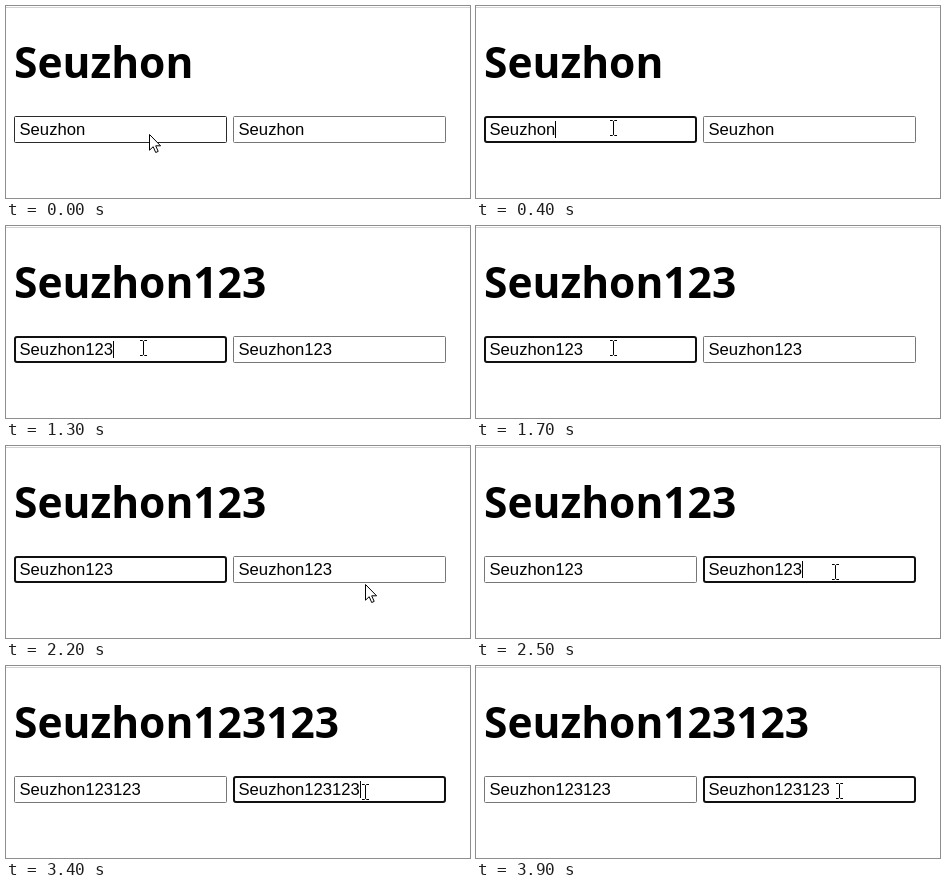
Write an HTML page that moves like this. It is 464x192 px and loops after 4 s.

```html
<!DOCTYPE html>
<html lang="en">
<head>
<meta charset="utf-8">
<title>Linked inputs</title>
<style>
  html, body { margin: 0; width: 100%; height: 100%; overflow: hidden; background: #fff; }
  svg { display: block; width: 464px; height: 192px; }
  .title { font: 700 42.5px "Open Sans", "Noto Sans", sans-serif; }
  .value { font: 16.67px "Liberation Sans", Arial, sans-serif; }
  .box { fill: #fff; stroke: #767676; stroke-width: 1; }
  .hover .box { stroke: #2b2b2b; }
  .focus .box { stroke: #101010; stroke-width: 2; }
  .caret { stroke: #000; stroke-width: 1; }
  .squiggle { fill: none; stroke: #b8403a; stroke-width: 1.2; }
</style>
</head>
<body>
<svg viewBox="0 0 464 192">
  <path d="M0 1.5H464" stroke="#d3d3d3"/>
  <text class="title" x="8" y="71.5"></text>
  <g id="fields"></g>
  <path id="arrow" d="M.5 .5V16.2L4.2 12.7L6.7 18.5L9.2 17.4L6.7 11.8H11.6Z" fill="#fff" stroke="#000"/>
  <path id="beam" d="M-3.5 -7.5H-1L0 -6.5L1 -7.5H3.5M0 -6.5V6.5M-3.5 7.5H-1L0 6.5L1 7.5H3.5" fill="none" stroke="#000"/>
</svg>
<script>
const LOOP = 4000, STEP = 100, NAME = "Seuzhon";
const KEY_TIMES = [1100, 1200, 1300, 3100, 3300, 3400];

// Pointer stops: time, x, y
const STOPS = [
  [0, 143, 128], [100, 140, 123], [200, 137, 122], [1900, 137, 122],
  [2000, 205, 150], [2100, 300, 166], [2200, 359, 138], [2300, 359, 126],
  [3800, 359, 126], [3900, 363, 125], [4000, 363, 125]
];

const $ = selector => document.querySelector(selector);
const within = (t, from, to) => t >= from && t < to;
const show = (node, visible) => node.setAttribute("visibility", visible ? "visible" : "hidden");
const moveTo = (node, x, y) => node.setAttribute("transform", `translate(${x} ${y})`);

function makeField(x) {
  const textX = x + 5.5;
  const group = document.createElementNS("http://www.w3.org/2000/svg", "g");
  group.innerHTML = `<rect class="box"/><path class="squiggle"/>
    <text class="value" x="${textX}" y="129"></text>
    <path class="caret" d="M.5 115V132"/>`;
  $("#fields").append(group);
  const [box, squiggle, text, caret] = group.children;

  return ({ value, focused, hovered, misspelt, caretOn }) => {
    group.setAttribute("class", focused ? "focus" : hovered ? "hover" : "");
    const inset = focused ? 1 : 0.5;
    box.setAttribute("x", x + inset);
    box.setAttribute("y", 110 + inset);
    box.setAttribute("width", 213 - 2 * inset);
    box.setAttribute("height", 27 - 2 * inset);
    box.setAttribute("rx", 2 * inset);
    text.textContent = value;
    const width = text.getComputedTextLength();
    squiggle.setAttribute("d", `M${x + 5} 133` + "l2 -2l2 2".repeat(Math.round(width / 4)));
    show(squiggle, misspelt);
    moveTo(caret, Math.round(textX + width), 0);
    show(caret, caretOn);
  };
}

function pointerAt(t) {
  const i = STOPS.findIndex(stop => stop[0] > t);
  const [t0, x0, y0] = STOPS[i - 1], [t1, x1, y1] = STOPS[i];
  const k = (t - t0) / (t1 - t0);
  return [x0 + (x1 - x0) * k, y0 + (y1 - y0) * k];
}

const drawLeft = makeField(8), drawRight = makeField(227);

function render(t) {
  const typed = KEY_TIMES.filter(time => time <= t).length;
  const value = NAME + "123123".slice(0, typed);
  $(".title").textContent = value;

  drawLeft({
    value,
    focused: within(t, 300, 2500),
    hovered: t < 300,
    misspelt: within(t, 500, 1100),
    caretOn: within(t, 300, 800) || within(t, 1100, 1700)
  });
  drawRight({
    value,
    focused: t >= 2500,
    hovered: within(t, 2300, 2500),
    misspelt: within(t, 2600, 3100),
    caretOn: within(t, 2500, 3000) || within(t, 3100, 3700)
  });

  const [x, y] = pointerAt(t);
  const isArrow = t < 100 || within(t, 2000, 2300);
  const cursor = isArrow ? $("#arrow") : $("#beam");
  show($("#arrow"), isArrow);
  show($("#beam"), !isArrow);
  moveTo(cursor, Math.round(x) + (isArrow ? 0 : 0.5), Math.round(y));
}

function tick() {
  render(Math.floor((performance.now() % LOOP) / STEP) * STEP);
  requestAnimationFrame(tick);
}
tick();
</script>
</body>
</html>
```
